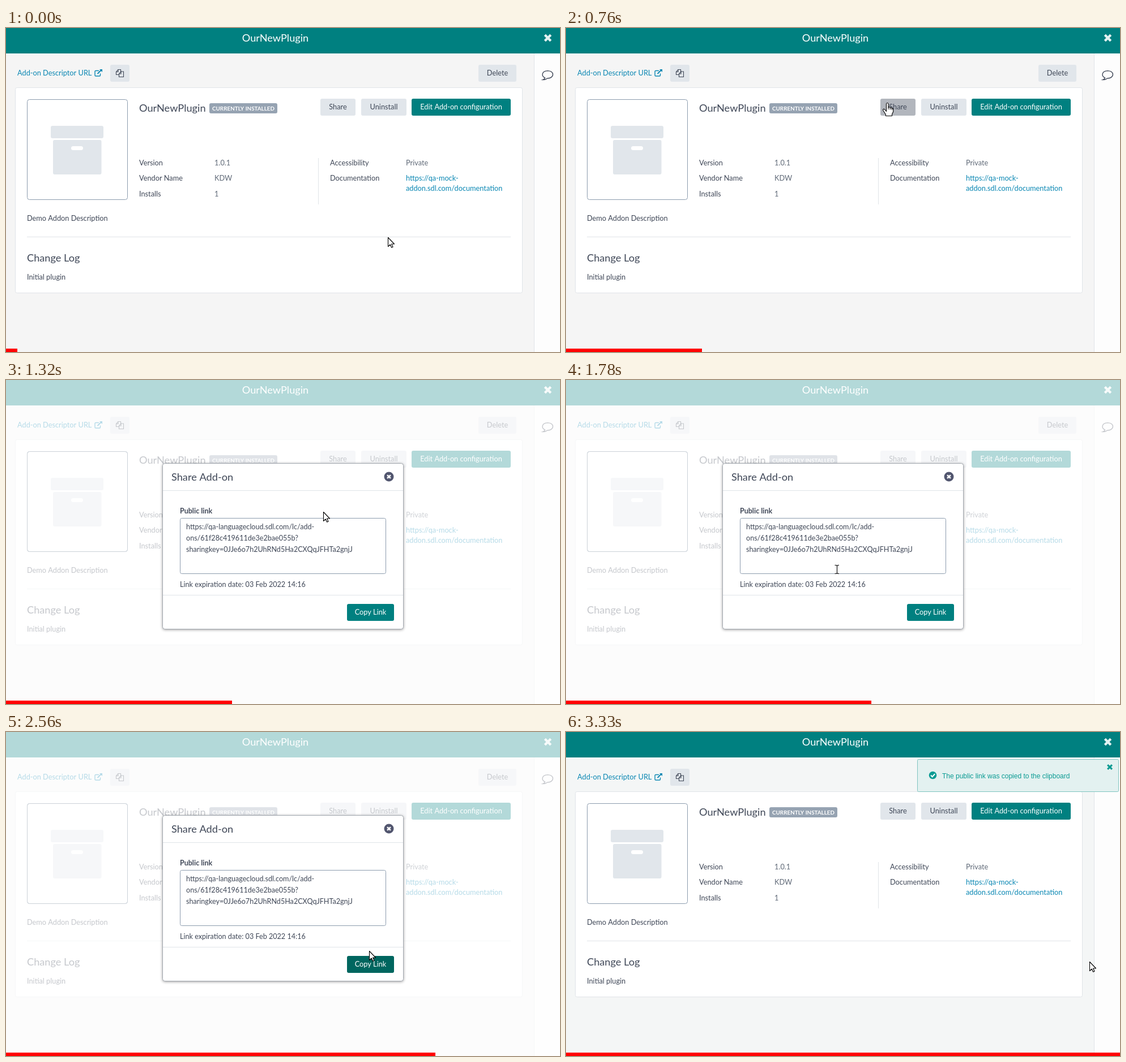
An HTML page with a canvas that plays this animation: 978x573 px, repeating every 3.4 s.

```html
<!DOCTYPE html>
<html lang="en">
<head>
<meta charset="utf-8">
<title>Share add-on</title>
<style>
html, body { margin: 0; width: 978px; height: 573px; overflow: hidden; background: #f5f5f5; }
canvas { display: block; }
</style>
</head>
<body>
<canvas id="stage" width="978" height="573"></canvas>
<script>
const W = 978, H = 573, LOOP = 3400, STEPS = 49;
const ctx = document.getElementById('stage').getContext('2d');
const NAME = 'OurNewPlugin';
const TEAL = '#008080', INK = '#3f4757', SOFT = '#5f6977', LINK = '#0a87b3';
const GREY = '#e1e6eb', LINE = '#e0e4e8', EDGE = '#8c9cae';

// Screen-recorder clock: [step, ms] anchors, evenly spaced between.
const CLOCK = [[0, 0], [9, 630], [11, 760], [17, 1180], [19, 1320], [24, 1660], [25, 1730],
  [26, 1780], [27, 1870], [32, 2210], [37, 2560], [40, 2780], [41, 2850], [42, 2910], [49, 3400]];

// Pointer path: [step, x, y]
const PATH = [[0, 674, 370], [1, 672, 364], [3, 646, 282], [5, 606, 178], [7, 581, 119], [8, 576, 115],
  [9, 571, 127], [11, 567, 133], [13, 567, 133], [16, 561, 145], [18, 561, 204], [19, 560, 233],
  [21, 436, 264], [23, 326, 294], [24, 314, 300], [26, 478, 335], [28, 585, 369], [30, 640, 398],
  [33, 643, 401], [35, 641, 387], [42, 641, 387], [43, 668, 389], [46, 884, 403], [47, 918, 406], [48, 924, 406]];

function lerpKeys(keys, v, col) {
  let i = 0;
  while (i < keys.length - 2 && v >= keys[i + 1][0]) i++;
  const a = keys[i], b = keys[i + 1];
  const k = Math.min(1, (v - a[0]) / (b[0] - a[0]));
  return a[col] + (b[col] - a[col]) * k;
}

const starts = Array.from({ length: STEPS }, (_, i) => Math.round(lerpKeys(CLOCK, i, 1) / 10) * 10);

function stepAt(ms) {
  let i = STEPS - 1;
  while (i > 0 && starts[i] > ms) i--;
  return i;
}

function text(s, x, y, color = INK, { size = 12.75, weight = 400, align = 'left', family = 'Lato' } = {}) {
  ctx.font = `${weight} ${size}px "${family}", sans-serif`;
  ctx.textAlign = align;
  ctx.fillStyle = color;
  ctx.fillText(s, x, y);
}

function box(x, y, w, h, r, fill, stroke) {
  ctx.beginPath();
  ctx.roundRect(x, y, w, h, r);
  if (fill) { ctx.fillStyle = fill; ctx.fill(); }
  if (stroke) { ctx.strokeStyle = stroke; ctx.lineWidth = 1; ctx.stroke(); }
}

function rect(x, y, w, h, color) {
  ctx.fillStyle = color;
  ctx.fillRect(x, y, w, h);
}

function button(label, x, y, w, bg = GREY, color = INK) {
  box(x, y, w, 30, 3, bg);
  text(label, x + w / 2, y + 19, color, { align: 'center' });
}

function stroke(d, color, width) {
  ctx.strokeStyle = color;
  ctx.lineWidth = width;
  ctx.stroke(new Path2D(d));
}

function at(x, y, draw) {
  ctx.save();
  ctx.translate(x, y);
  draw();
  ctx.restore();
}

function cross(x, y, r, color, width) {
  at(x, y, () => stroke(`M${-r} ${-r}L${r} ${r}M${r} ${-r}L${-r} ${r}`, color, width));
}

function disc(x, y, r, color) {
  ctx.beginPath();
  ctx.arc(x, y, r, 0, Math.PI * 2);
  ctx.fillStyle = color;
  ctx.fill();
}

function topIcons() {
  at(156, 72, () => {
    stroke('M8 3.5H2.5Q1 3.5 1 5V11.5Q1 13 2.5 13H9Q10.5 13 10.5 11.5V8.5', LINK, 1.4);
    stroke('M5.5 9L12.5 2', LINK, 1.8);
    ctx.fillStyle = LINK;
    ctx.fill(new Path2D('M9 1H14V6Z'));
  });
  at(194, 73, () => {
    stroke('M5.5 9.5H.5V4.5L4 .5H8.5V4M.5 4.5H4V.5', INK, 1.1);
    ctx.fillStyle = GREY;
    ctx.fill(new Path2D('M9 4H13.5V13.5H5.5V8Z'));
    stroke('M9 4H13.5V13.5H5.5V8L9 4V8H5.5', INK, 1.1);
  });
}

function bubble() {
  stroke('M951.5 88.2C944.5 85 945.5 76 956.5 75.6C968.5 76 968.5 88.8 956 89C953 91.2 950.5 91.8 947.6 91.6Q950.6 90.6 951.5 88.2Z', INK, 1.4);
}

function page(pressed, bg) {
  rect(0, 0, W, H, bg);
  rect(932, 45, 46, 528, '#fdfdfd');
  rect(932, 45, 1, 528, LINE);
  rect(0, 0, W, 45, TEAL);
  text(NAME, 475.5, 24, '#fff', { size: 18.2, align: 'center' });
  cross(956.5, 17.5, 5.2, '#e4f2f2', 4.3);
  bubble();

  text('Add-on Descriptor URL', 20, 84, LINK);
  box(184, 65, 34, 30, 3, GREY);
  topIcons();
  button('Delete', 834, 65, 67);

  box(16.5, 105.5, 895, 363, 3, '#fff', LINE);
  box(37.5, 126.5, 177, 177, 4, '#fff', EDGE);
  box(79, 173, 93, 22, 3, GREY);
  box(83, 198, 85.5, 61, 3, GREY);
  box(115, 209, 21, 7, 3.5, '#fff');

  text(NAME, 235, 147.5, INK, { size: 18.2 });
  box(359, 133, 120, 18, 3, '#96a3b2');
  text('CURRENTLY INSTALLED', 419, 145.5, '#fff', { size: 9.85, weight: 700, align: 'center' });
  button('Share', 555, 125, 62, pressed ? '#b2b6bd' : GREY);
  button('Uninstall', 627, 125, 80);
  button('Edit Add-on configuration', 716, 125, 175, TEAL, '#fff');

  [['Version', '1.0.1'], ['Vendor Name', 'KDW'], ['Installs', '1']].forEach(([key, value], i) => {
    const y = 242.5 + i * 27.8;
    text(key, 235, y);
    text(value, 368, y, SOFT);
  });
  rect(551, 230, 1, 82, LINE);
  text('Accessibility', 572, 242.5);
  text('Private', 706, 242.5, SOFT);
  text('Documentation', 572, 270.3);
  text('https://qa-mock-', 706, 270.3, LINK);
  text('addon.sdl.com/documentation', 706, 288.3, LINK);

  text('Demo Addon Description', 37, 340.5);
  rect(37, 369, 854, 1, LINE);
  text('Change Log', 37, 412.5, INK, { size: 18.2 });
  text('Initial plugin', 37, 444.5);
}

function veil(alpha) {
  rect(0, 0, W, H, `rgba(255,255,255,${alpha})`);
  box(37.5, 126.5, 177, 177, 4, null, '#cbd1d8');
}

function dialog(focused) {
  ctx.save();
  ctx.shadowColor = 'rgba(0,0,0,.45)';
  ctx.shadowBlur = 5;
  ctx.shadowOffsetY = 1;
  box(276.5, 147.5, 425, 293, 4, '#fff');
  ctx.restore();
  box(276.5, 147.5, 425, 293, 4, null, '#a3a9b0');
  text('Share Add-on', 292, 178, INK, { size: 18.2 });
  disc(676, 171, 8.5, '#52566f');
  cross(676, 171, 2.9, '#fff', 2.6);
  rect(277, 195, 424, 1, LINE);
  rect(277, 380, 424, 1, LINE);
  text('Public link', 307, 235.5, INK, { weight: 700, size: 12.5 });
  box(307.5, 244.5, 363, 98, 3, '#fff', EDGE);
  ['https://qa-languagecloud.sdl.com/lc/add-', 'ons/61f28c419611de3e2bae055b?',
    'sharingkey=0JJe6o7h2UhRNd5Ha2CXQqJFHTa2gnjJ'].forEach((s, i) => {
    text(s, 318, 264 + i * 20, INK, { size: 12.6 });
  });
  text('Link expiration date: 03 Feb 2022 14:16', 307, 366.3, INK, { size: 12.6 });
  button('Copy Link', 602, 396, 83, focused ? '#00665f' : TEAL, '#fff');
}

function toast(dy) {
  const green = '#0b9b93';
  ctx.save();
  ctx.beginPath();
  ctx.rect(0, 38, W, H);
  ctx.clip();
  ctx.translate(0, dy);
  box(620.5, 48.5, 355, 57, 2, '#e3f1f0', '#7fc4c0');
  disc(647.5, 76.5, 6.8, green);
  stroke('M644 76.5L646.7 79.2L651.2 74.2', '#fff', 2);
  text('The public link was copied to the clipboard', 664, 82, green, { size: 12, family: 'Liberation Sans' });
  cross(960, 62, 3.9, green, 3.2);
  ctx.restore();
}

const ARROW = new Path2D('M.5 .5V16.5L4.2 13L6.6 18.3L9 17.3L6.6 12H11.5Z');
const HAND = new Path2D('M-1.5 1.5Q-1.5 -.5 .3 -.5Q2 -.5 2 1.5V7.5Q2.5 6.3 4 6.7Q5.2 7 5.2 8.3Q6 7.4 7.2 7.9Q8.3 8.3 8.3 9.5Q9.3 8.8 10.2 9.6Q10.7 10 10.7 11.5V15L8.5 19.5V22.5H-2.5V20L-7 13Q-8 11 -6.5 10.4Q-5 10 -3.5 12L-1.5 14.5Z');

function pointer(kind, x, y) {
  at(Math.round(x), Math.round(y), () => {
    if (kind === 'text') {
      stroke('M-3.5 -7.5H-1L.5 -6.5L2 -7.5H4M.5 -6.5V6.5M-3.5 7.5H-1L.5 6.5L2 7.5H4', '#000', 1.1);
      return;
    }
    const shape = kind === 'hand' ? HAND : ARROW;
    ctx.lineJoin = 'round';
    ctx.fillStyle = '#fff';
    ctx.fill(shape);
    ctx.strokeStyle = '#000';
    ctx.lineWidth = 1.1;
    ctx.stroke(shape);
    if (kind === 'hand') stroke('M2 7V11M5.2 8V11.5M8.3 9.5V12', '#000', 1);
  });
}

function pointerKind(n) {
  if ((n >= 9 && n <= 13) || (n >= 30 && n <= 34)) return 'hand';
  return n >= 20 && n <= 26 ? 'text' : 'arrow';
}

function draw(n) {
  page(n >= 9 && n <= 12, n >= 41 ? '#f4f6f6' : '#f5f5f5');
  const fade = n < 13 || n > 39 ? 0 : n === 13 || n === 39 ? 0.35 : 0.7;
  if (fade) veil(fade);
  if (n >= 14 && n <= 38) dialog(n >= 30);
  if (n >= 41) toast([-27.5, -9][n - 41] || 0);
  pointer(pointerKind(n), lerpKeys(PATH, n, 1), lerpKeys(PATH, n, 2));
  rect(0, 567, Math.round(W * (n + 1) / STEPS), 6, '#f00');
}

const began = performance.now();
let shown = -1;
function tick() {
  const n = stepAt((performance.now() - began) % LOOP);
  if (n !== shown) draw(shown = n);
  requestAnimationFrame(tick);
}
tick();
</script>
</body>
</html>
```
